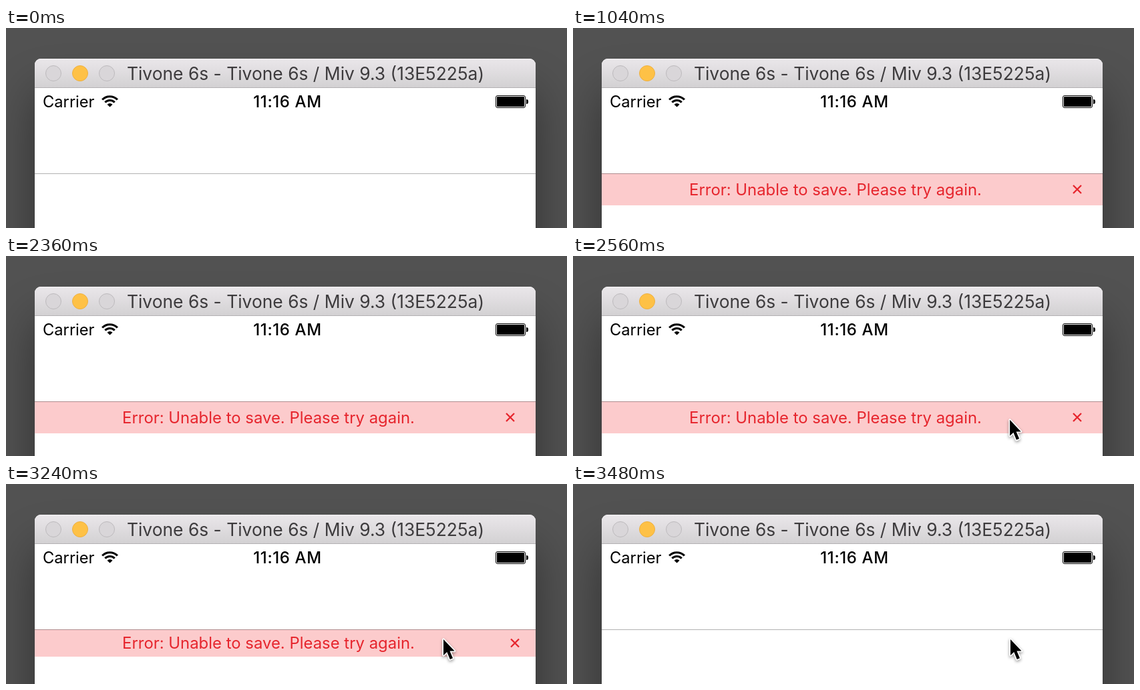
Animation, 840 px wide and 300 px high, one loop 3.8 s. Source, as an HTML page with a canvas:

```html
<!DOCTYPE html>
<html lang="en">
<head>
<meta charset="utf-8">
<title>Error banner</title>
<style>
  html, body { margin: 0; width: 100%; height: 100%; overflow: hidden; background: #525252; }
  canvas { display: block; }
</style>
</head>
<body>
<canvas id="stage" width="840" height="300"></canvas>
<script>
const ctx = document.getElementById("stage").getContext("2d");

const LOOP = 3800, TICK = 40;
const WIN = { left: 43, top: 46, width: 750 };
const BANNER = { top: 218, height: 48, show: 400, closeStart: 3160, closeEnd: 3320 };
const POINTER = { enter: 2400, rest: 2760, fromX: 649, fromY: 306, x: 654, y: 231 };
const RED = "#e6252d";

const clamp01 = v => Math.min(1, Math.max(0, v));
const progress = (t, start, end) => clamp01((t - start) / (end - start));
const easeOut = p => 1 - (1 - p) ** 3;
const mix = (a, b, p) => a + (b - a) * p;

function rect(x, y, w, h, color) {
  ctx.fillStyle = color;
  ctx.fillRect(x, y, w, h);
}

function roundRect(x, y, w, h, radii) {
  ctx.beginPath();
  ctx.roundRect(x, y, w, h, radii);
}

function text(value, x, y, size, color, { weight = 400, align = "left", tracking = 0 } = {}) {
  ctx.font = `${weight} ${size}px Inter, sans-serif`;
  ctx.letterSpacing = `${tracking}px`;
  ctx.textAlign = align;
  ctx.fillStyle = color;
  ctx.fillText(value, x, y);
}

function drawWindow() {
  rect(0, 0, 840, 300, "#525252");
  ctx.save();
  ctx.shadowColor = "rgba(0,0,0,.4)";
  ctx.shadowBlur = 70;
  ctx.shadowOffsetY = 50;
  ctx.fillStyle = "#fff";
  roundRect(WIN.left, WIN.top, WIN.width, 900, [9, 9, 0, 0]);
  ctx.fill();
  ctx.restore();

  const shade = ctx.createLinearGradient(0, 46, 0, 89);
  shade.addColorStop(0, "#f3f1f3");
  shade.addColorStop(0.05, "#e9e6e9");
  shade.addColorStop(1, "#d3d1d3");
  ctx.fillStyle = shade;
  roundRect(WIN.left, WIN.top, WIN.width, 43, [9, 9, 0, 0]);
  ctx.fill();
  rect(WIN.left, 89, WIN.width, 1, "#b3b1b3");

  drawLight(71, "#d9d6d9", "#bdbabd");
  drawLight(111, "#fec146", "#eeb040");
  drawLight(151, "#d9d6d9", "#bdbabd");
  text("Tivone 6s - Tivone 6s / Miv 9.3 (13E5225a)", 448.5, 78, 26.4, "#3d3b3d", { align: "center" });
}

function drawLight(x, fill, edge) {
  ctx.beginPath();
  ctx.arc(x, 68, 11.5, 0, Math.PI * 2);
  ctx.fillStyle = fill;
  ctx.fill();
  ctx.lineWidth = 1;
  ctx.strokeStyle = edge;
  ctx.stroke();
}

function drawStatusBar() {
  text("Carrier", 55, 119, 23.7, "#000");
  text("11:16 AM", 421.5, 119, 24, "#000", { weight: 550, align: "center", tracking: 0.6 });
  drawWifi(155.5, 118.5);
  drawBattery();
}

function drawWifi(x, y) {
  const from = -Math.PI * 0.755, to = -Math.PI * 0.245;
  ctx.fillStyle = ctx.strokeStyle = "#000";
  ctx.beginPath();
  ctx.moveTo(x, y);
  ctx.arc(x, y, 5.5, from, to);
  ctx.fill();
  ctx.lineWidth = 3;
  for (const radius of [10, 15.8]) {
    ctx.beginPath();
    ctx.arc(x, y, radius, from, to);
    ctx.stroke();
  }
}

function drawBattery() {
  ctx.lineWidth = 1;
  ctx.strokeStyle = ctx.fillStyle = "#000";
  roundRect(733.5, 101.5, 44, 18, 2.5);
  ctx.stroke();
  roundRect(735, 103, 41, 15, 1);
  ctx.fill();
  roundRect(779, 107, 3, 7, [0, 3, 3, 0]);
  ctx.fill();
}

function drawBanner(t) {
  if (t < BANNER.show || t >= BANNER.closeEnd) return;
  const closing = progress(t, BANNER.closeStart, BANNER.closeEnd) ** 2.77;
  const height = BANNER.height * (1 - closing);
  const middle = BANNER.top + height / 2;

  ctx.save();
  ctx.beginPath();
  ctx.rect(WIN.left, BANNER.top, WIN.width, height);
  ctx.clip();
  rect(WIN.left, BANNER.top, WIN.width, height, "#fccbcc");
  text("Error: Unable to save. Please try again.", 393, middle + 9, 23.9, RED, { align: "center" });
  drawCross(755 + BANNER.height - height, middle);
  ctx.restore();
}

function drawCross(x, y) {
  const arm = 6;
  ctx.beginPath();
  ctx.moveTo(x - arm, y - arm);
  ctx.lineTo(x + arm, y + arm);
  ctx.moveTo(x + arm, y - arm);
  ctx.lineTo(x - arm, y + arm);
  ctx.lineWidth = 2.3;
  ctx.strokeStyle = RED;
  ctx.stroke();
}

function drawPointer(t) {
  if (t < POINTER.enter) return;
  const p = easeOut(progress(t, POINTER.enter, POINTER.rest));
  const outline = [[1, 2], [1, 26], [6.3, 21], [10.8, 32], [15, 30.2], [10.5, 19.6], [17.6, 19.6]];
  ctx.save();
  ctx.translate(mix(POINTER.fromX, POINTER.x, p), mix(POINTER.fromY, POINTER.y, p));
  ctx.beginPath();
  for (const [x, y] of outline) ctx.lineTo(x, y);
  ctx.closePath();
  ctx.lineWidth = 3.4;
  ctx.lineJoin = "round";
  ctx.strokeStyle = "#fff";
  ctx.shadowColor = "rgba(0,0,0,.4)";
  ctx.shadowBlur = 4;
  ctx.shadowOffsetY = 2;
  ctx.stroke();
  ctx.shadowColor = "transparent";
  ctx.fillStyle = "#000";
  ctx.fill();
  ctx.restore();
}

function render(now) {
  const t = Math.floor((now % LOOP) / TICK) * TICK;
  drawWindow();
  drawStatusBar();
  drawBanner(t);
  rect(WIN.left, BANNER.top, WIN.width, 1, "rgba(0,0,0,.3)");
  drawPointer(t);
}

const start = performance.now();
function loop() {
  render(performance.now() - start);
  requestAnimationFrame(loop);
}
loop();
</script>
</body>
</html>
```
